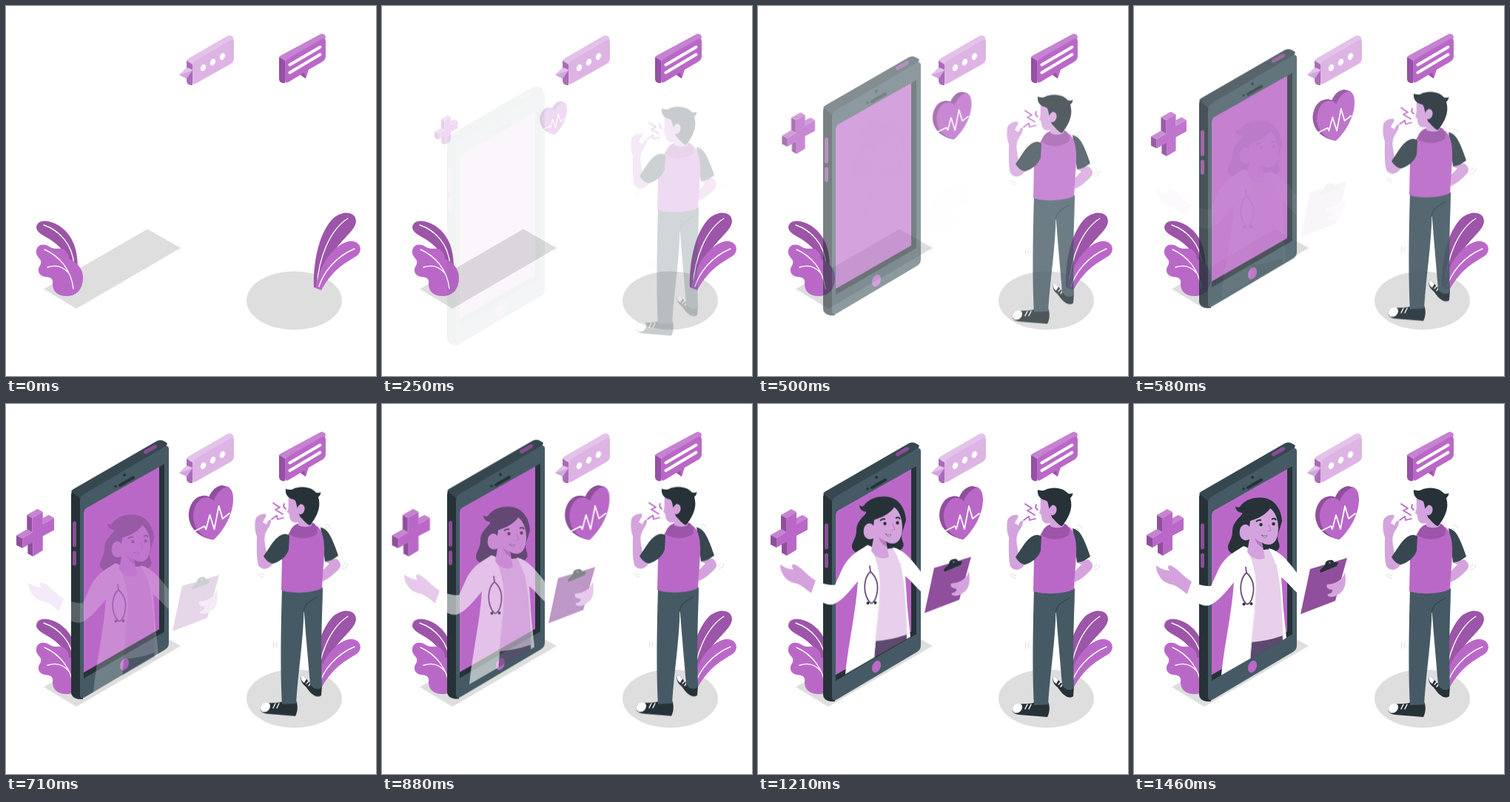
Recreate the animation shown at these times as an HTML page. Size 500 by 500 pixels, loop 1500 ms.

```html
<!DOCTYPE html>
<html lang="en">
<head>
<meta charset="utf-8">
<title>Online doctor</title>
<style>
html, body { margin: 0; width: 100%; height: 100%; overflow: hidden; background: #fff; }
svg { display: block; width: 100vw; height: 100vh; }

.main { fill: #ba68c8; }
.deep { fill: #9c55a8; }
.side { fill: #8f4f9c; }
.lite { fill: #c583d1; }
.skin { fill: #d4a3dd; }
.ink { fill: #263238; }
.slate { fill: #455a64; }
.coal { fill: #37474f; }
.floor { fill: #dedede; }
.white { fill: #fff; }
.line { fill: none; stroke: #fff; stroke-width: 1.4; stroke-linecap: round; stroke-linejoin: round; }

/* Each keyframe block covers the 1.5 s loop; the curve overshoots slightly. */
.rise, .fade, .zoom, .late {
  animation: 1.5s cubic-bezier(.36, -.01, .5, 1.38) infinite both;
}
.rise { animation-name: rise; }
.fade { animation-name: fade; }
.zoom { animation-name: zoom; transform-origin: 160.5px 158px; }
.late { animation-name: late; }
.man { --drop: 30px; }
.phone { --drop: 75px; }

@keyframes rise {
  0% { opacity: 0; transform: translateY(var(--drop)); }
  64%, 100% { opacity: 1; transform: translateY(0); }
}
@keyframes fade {
  0% { opacity: 0; }
  64%, 100% { opacity: 1; }
}
@keyframes zoom {
  0% { opacity: 0; transform: scale(.5); }
  64%, 100% { opacity: 1; transform: scale(1); }
}
@keyframes late {
  0%, 30.5% { opacity: 0; transform: translateY(30px); }
  97%, 100% { opacity: 1; transform: translateY(0); }
}
</style>
</head>
<body>
<svg viewBox="0 0 500 500">
  <!-- floor shadows -->
  <path class="floor" d="M51 382.500 191 301.500 236 327 95 409Z"/>
  <ellipse class="floor" cx="389.500" cy="398" rx="64.500" ry="39.500"/>

  <!-- left plant -->
  <path class="deep" d="M41 299C42 288 58 288 72 297C88 308 97 325 97 354L90 360C86 335 70 322 57 314C47 308 41 305 41 299Z"/>
  <path class="line" d="M51 296C72 303 90 322 92 350"/>
  <path class="main" d="M41 331C42 322 51 320 60 326C66 329 69 327 75 328C82 330 85 336 85 342C95 345 104 355 104 367C104 382 96 392 82 392C70 392 63 386 63 376C64 369 61 367 55 366C47 366 43 361 44 355C45 351 48 350 47 344C45 340 40 337 41 331Z"/>
  <path class="line" d="M52 329C72 338 88 356 91 382M56 353C68 349 78 353 85 361"/>

  <!-- right plant -->
  <path class="deep" d="M416 380C415 340 425 305 441 288C455 275 473 278 473 291C472 302 460 310 448 325C435 342 428 360 425 383Z"/>
  <path class="line" d="M420 378C423 340 437 303 462 287"/>
  <path class="main" d="M418 381C425 345 445 322 463 318C477 316 483 328 476 336C465 345 445 350 426 384Z"/>
  <path class="line" d="M423 379C429 360 445 339 471 328"/>

  <!-- light speech bubble -->
  <path d="M244 75Q244 72 248 70L300 40Q304 39 307 42L308 48 252 80Z" fill="#e3c3e9"/>
  <path d="M244 74 252 79V107Q244 107 244 101Z" fill="#ab6cb8"/>
  <path d="M252 82Q252 77 256 74L302 47Q308 44 308 50V71Q308 75 304 78L258 104Q252 108 252 103Z" fill="#ddb4e4"/>
  <path d="M234 93 244 83 252 86 244 98Z" fill="#e3c3e9"/>
  <path d="M234 93 244 98 252 87Z" fill="#d5a6de"/>
  <g class="white">
    <ellipse cx="266.500" cy="83.500" rx="3.300" ry="4.800" transform="rotate(25 266.500 83.500)"/>
    <ellipse cx="279.500" cy="75.800" rx="3.300" ry="4.800" transform="rotate(25 279.500 75.800)"/>
    <ellipse cx="292.500" cy="68.300" rx="3.300" ry="4.800" transform="rotate(25 292.500 68.300)"/>
  </g>

  <!-- dark speech bubble -->
  <path class="lite" d="M369 70Q369 68 373 66L425 38Q429 36 432 41L431 46 377 78Z"/>
  <path d="M369 69 377 74V104Q369 105 369 98Z" fill="#9650a4"/>
  <path class="main" d="M377 79Q377 74 381 71L426 45Q432 42 432 48V68Q432 72 428 75L409 86 405 98 398 93 383 102Q377 106 377 100Z"/>
  <path d="M398 93 405 98 403 90Z" fill="#9650a4"/>
  <path class="line" style="stroke-width:4" d="M383.500 79.500 424.500 55.500M383.500 90 424.500 65.500"/>

  <g class="man rise">
    <!-- arms -->
    <path class="skin" d="M430 214 446 210C452 214 454 219 450 224C444 231 436 237 428 241V226L437 217Z"/>
    <path class="skin" d="M337 158C338 152 346 149 351 150C353 153 349 156 347 161L352 164C353 160 356 157 358 158C359 162 355 168 352 173C349 178 349 184 350 190L352 203 361 216C356 225 346 227 341 219C338 208 339 190 339 180C336 172 336 164 337 158Z"/>
    <!-- shoes and trousers -->
    <path class="ink" d="M374 403C366 407 351 403 345 408C342 415 344 419 354 420L391 423C394 418 395 409 392 402Z"/>
    <path class="white" d="M345 408C350 403 357 404 357 409C357 415 352 419 346 417Q342 413 345 408Z"/>
    <path class="line" d="M361 412 364 406M366 412 369 406"/>
    <path class="ink" d="M411 378 400 367C397 371 398 378 405 383C411 392 419 400 426 395L427 382Z"/>
    <path class="white" d="M400 367 406 373 403 378C398 375 398 370 400 367Z"/>
    <path class="line" d="M406 379 410 375M409 382 412 378"/>
    <path class="slate" d="M373 250C385 256 415 256 428 249C428 275 425 310 427 384C422 388 415 387 411 380L405 310 402.500 278C402 320 395 360 392 406L373 407C371 370 371 320 373 250Z"/>
    <path d="M421 262C412 267 404 270 402 282" fill="none" stroke="#37474f" stroke-width="1.500"/>
    <!-- shirt -->
    <path class="coal" d="M425 168C436 170 441 183 449 206C443 211 437 214 431 214L428 190Z"/>
    <path class="main" d="M385 172C378 180 373 195 373 210L372 253C386 258 415 257 427 250L430 205C431 187 428 171 420 166Z"/>
    <path class="coal" d="M383 179C375 173 365 181 358 192L348 207C351 212 355 216 361 217C370 214 379 208 382 198Z"/>
    <path class="deep" d="M383 177C384 169 390 163 398 162L415 162C421 165 422 172 420 177C409 185 392 184 383 177Z"/>
    <!-- head -->
    <path class="skin" d="M382 124C381 136 383 141 380 147L383 150C383 158 386 163 395 161L395 165C401 168 408 168 413 165L414 148 402 130Z"/>
    <path class="ink" d="M378 116C382 117 386 118 390 115C399 112 413 113 419 121C422 121 424 122 425 120C426 123 424 125 422 127C426 140 421 152 411 165C406 164 402 158 397 153L393 139C392 135 392 131 388 130C382 129 377 124 378 116Z"/>
    <ellipse class="skin" cx="398.500" cy="143.500" rx="5" ry="7" transform="rotate(12 398.500 143.500)"/>
    <!-- pain and shiver marks -->
    <path class="line" style="stroke:#ba68c8;stroke-width:1.800" d="M361 135 370 141 364 144 374 150M359 157 366 152 367 157 375 155M376 136 375 140 378 143"/>
    <path class="line" style="stroke:#d2d2d2;stroke-width:.8" d="M431 164Q437 164 438 168M430 168Q433 168 434 171M340 230Q343 235 348 235M343 229Q345 232 348 232M455 224Q460 224 462 217M454 220Q457 220 458 216M362 322Q360 326 362 331M366 323Q364 326 366 330"/>
  </g>

  <!-- the phone fades twice, so it appears later than it moves -->
  <g class="fade">
    <g class="phone rise">
      <path class="ink" d="M88 126Q88 120 94 117L104 128V402H98Q88 400 88 393Z"/>
      <path class="coal" d="M88 121Q89 119 93 117L204 53Q209 51 213 53L218 56 216 62 100 131Z"/>
      <path class="slate" d="M100 134Q100 128 105 125L214 61Q220 58 220 64V326Q220 332 215 335L107 399Q100 403 100 396Z"/>
      <path class="ink" d="M105 147 214 84V311L105 374Z"/>
      <path class="main" d="M105 149Q105 146 108 144L207 88V307.500L105 366Z"/>
      <g fill="none" stroke-linecap="round">
        <path stroke="#263238" stroke-width="4" d="M154 113 172 102.500"/>
        <path stroke="#894d96" stroke-width="5" d="M188.500 68 201.500 60.500M92.500 164V194M92.500 204V219"/>
      </g>
      <circle class="ink" cx="160" cy="99" r="2"/>
      <circle class="ink" cx="148" cy="114.500" r="1.700"/>
      <ellipse class="main" cx="160" cy="355" rx="5.600" ry="8.500" transform="rotate(22 160 355)"/>
    </g>
  </g>

  <g class="zoom">
    <!-- cross -->
    <path class="side" d="M31 150 38 154V173L31 169ZM17 177 25 181V194L17 190ZM32 188 39 186V205L32 201Z"/>
    <path class="lite" d="M31 150 45 142 52 146 38 154ZM52 154 60 150 67 154 52 162ZM17 177 31 169 38 173 25 181Z"/>
    <path class="main" d="M38 154 52 146V162L67 154V170L52 178V197L39 205V186L25 194V181L38 173Z"/>
    <!-- heart -->
    <path class="side" d="M277 183C256 179 245 166 245 149C246 135 254 126 262 125C267 124 270 125 272 126C275 118 282 111 290 111L298 113 300 140Z"/>
    <path class="main" d="M278 183C262 180 251 168 251 151C252 137 259 128 267 127C273 127 277 129 278 132C281 122 289 114 296 113C302 114 304 121 304 129C304 148 293 169 278 183Z"/>
    <path class="line" style="stroke-width:1.800" d="M254 171 266 165 268 169 273 150 279 169 285 138 290 155 299 148"/>
  </g>

  <g class="late">
    <!-- hair and far hand -->
    <path class="ink" d="M137 138C139 140 141 140 143 139C149 130 161 125 176 127C190 129 199 142 200 158C197 171 192 178 195 186C198 192 197 197 190 200L150 205C136 206 126 201 127 193C128 186 133 182 133 172C133 162 139 157 146 149L146 147C141 147 137 143 137 138Z"/>
    <path class="skin" d="M30 218C35 222 41 225 48 225C45 221 45 218 49 218C59 222 65 232 78 240L72 257C65 252 59 246 52 244C44 243 37 238 34 232C31 228 30 223 30 218Z"/>
    <!-- shirt, trousers, coat -->
    <path fill="#5e4a6e" d="M157 318 201 308V319L157 344Z"/>
    <path fill="#e8cfec" d="M150 200 184 196 194 212C202 240 202 275 201 313Q178 321 157 322L158 260Z"/>
    <path class="white" d="M182 195C198 199 207 211 220 228L231 238 226 260C215 251 207 240 199 234C200 265 204 295 206 316L201 319C199 275 200 235 188 207Z"/>
    <path class="white" d="M148 192C133 202 124 205 114 224L104 246C94 246 86 244 78 240L72 257C79 265 91 275 102 272C114 267 124 254 135 241C132 285 122 325 118 366.500L157 344C160 310 167 270 165 238C163 223 158 205 153 194Z"/>
    <path d="M153 194C160 212 166 228 165 244C165 275 159 310 157 344M192 216C198 250 199 285 202 318" fill="none" stroke="#ddd7df" stroke-width="1"/>
    <!-- head -->
    <path class="skin" d="M157 158C167 155 178 150 184 141C190 145 195 155 195 168C195 182 190 190 182 190C178 190 175 189 173 187L177 208C168 213 158 208 153 200L156 183C148 187 141 180 143 171C144 163 152 160 156 166Z"/>
    <path d="M173 187Q166 185 163 181Q166 191 174 194Z" fill="#b27abd"/>
    <circle class="ink" cx="171.500" cy="163" r="2.200"/>
    <circle class="ink" cx="188.500" cy="162" r="2.200"/>
    <path d="M165 159Q168 156 172 157M186 156Q190 153 192 157" fill="none" stroke="#263238" stroke-width="2"/>
    <path d="M182 163 185 171 181 172" fill="none" stroke="#b27abd"/>
    <path class="white" d="M172 177Q176 179 180 178Q178 183 172 177Z" stroke="#5e4a6e" stroke-width=".8"/>
    <!-- stethoscope -->
    <path d="M151 220 152 228C143 236 142 253 148 265Q150 269 153 271M152 228C163 238 163 252 159 264Q157 269 153 271" fill="none" stroke="#6b4b79" stroke-width="1.800"/>
    <circle class="ink" cx="148.500" cy="270.500" r="2"/>
    <circle class="ink" cx="158.500" cy="270" r="2"/>
    <!-- clipboard -->
    <path class="side" d="M238 223 288 208 272 266 225 284Z"/>
    <path class="ink" d="M251 225 258 218Q258 212 264 211Q270 210 270 214L276 214 274 219 252 228Z"/>
    <circle class="side" cx="264.500" cy="214.500" r="1.500"/>
    <path class="skin" d="M285 228C287 240 286 251 278 256C268 264 260 260 262 257C267 256 269 253 268 251C262 251 259 247 261 244C269 243 280 241 285 228Z"/>
  </g>
</svg>
</body>
</html>
```
